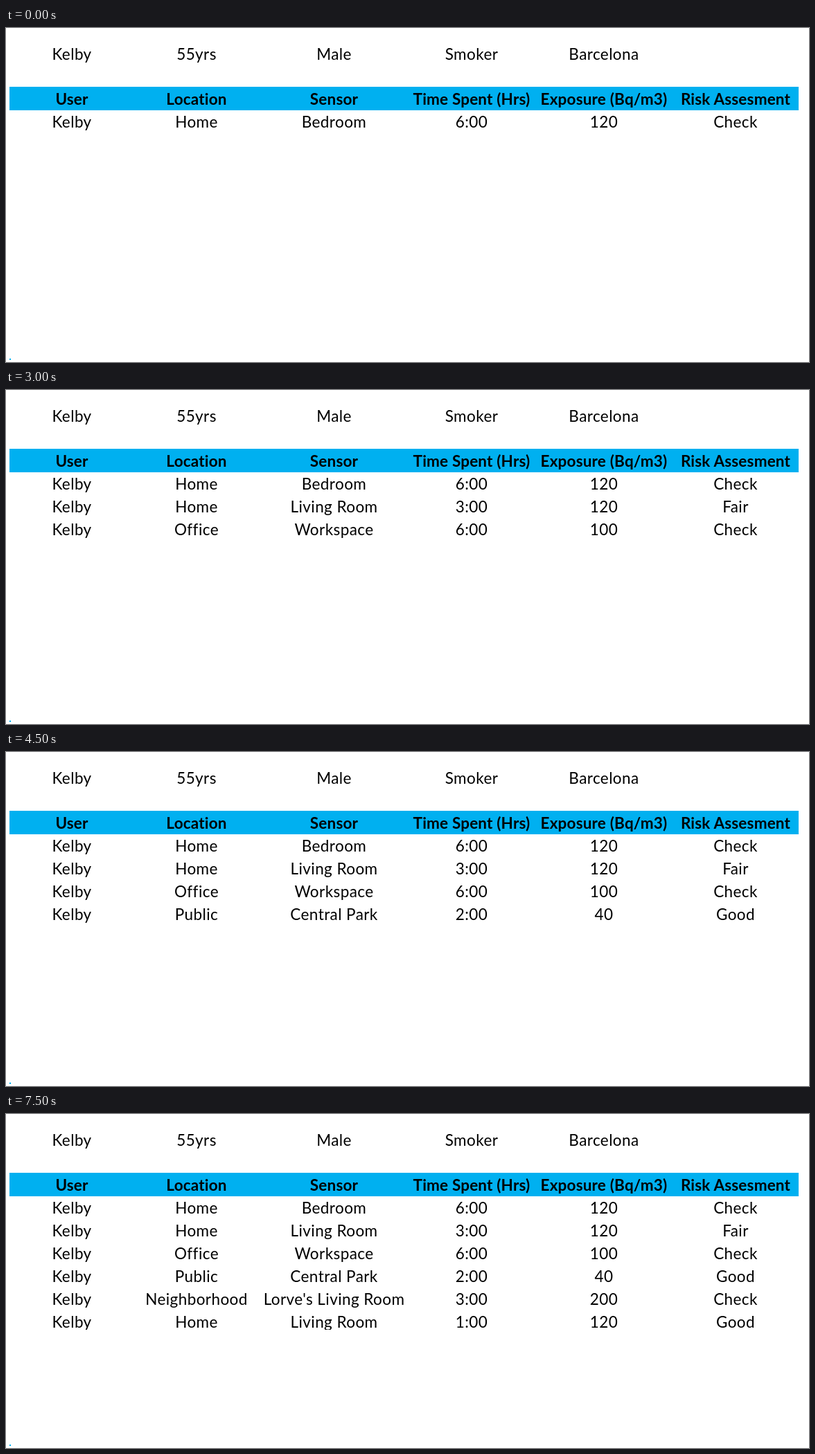
An HTML page that plays this animation: 1159 px wide and 483 px high, repeating every 8000 ms.

```html
<!DOCTYPE html>
<html lang="en">
<head>
<meta charset="utf-8">
<title>Exposure log</title>
<style>
  html, body { margin: 0; width: 100%; height: 100%; overflow: hidden; background: #fff; }
  svg { display: block; }
  text { font: 22.5px Lato, "Open Sans", sans-serif; letter-spacing: .42px; text-anchor: middle; }
  .head { font-weight: 700; letter-spacing: .18px; }
</style>
</head>
<body>
<svg width="1159" height="483" viewBox="0 0 1159 483">
  <defs><clipPath id="sheet"><path d="M0 0H1159V312H0z"/></clipPath></defs>
  <path fill="#00b0f0" d="M5 85H1144V119H5zM5 478h2v2h-2z"/>
  <g id="table" clip-path="url(#sheet)"></g>
</svg>
<script>
const NS = "http://www.w3.org/2000/svg";
const table = document.getElementById("table");
const columns = [95, 275, 473.5, 672, 863, 1053];
const user = "Kelby";
const log = [
  "Home|Bedroom|6:00|120|Check",
  "Home|Living Room|3:00|120|Fair",
  "Office|Workspace|6:00|100|Check",
  "Public|Central Park|2:00|40|Good",
  "Neighborhood|Lorve's Living Room|3:00|200|Check",
  "Home|Living Room|1:00|120|Good"
];

function addRow(cells, y, className = "") {
  const row = document.createElementNS(NS, "g");
  cells.split("|").forEach((cell, i) => {
    const text = document.createElementNS(NS, "text");
    text.setAttribute("x", columns[i]);
    text.setAttribute("y", y);
    text.setAttribute("class", className);
    text.textContent = cell;
    row.append(text);
  });
  table.append(row);
  return row;
}

addRow(user + "|55yrs|Male|Smoker|Barcelona", 46);
addRow("User|Location|Sensor|Time Spent (Hrs)|Exposure (Bq/m3)|Risk Assesment", 111, "head");
const rows = log.map((entry, i) => addRow(user + "|" + entry, 144 + 33 * i));

const start = performance.now();
function draw(now) {
  const time = Math.max(0, now - start) % 8000;
  rows.forEach((row, i) => row.setAttribute("visibility", time >= i * 1500 ? "visible" : "hidden"));
  requestAnimationFrame(draw);
}
draw(start);
</script>
</body>
</html>
```
